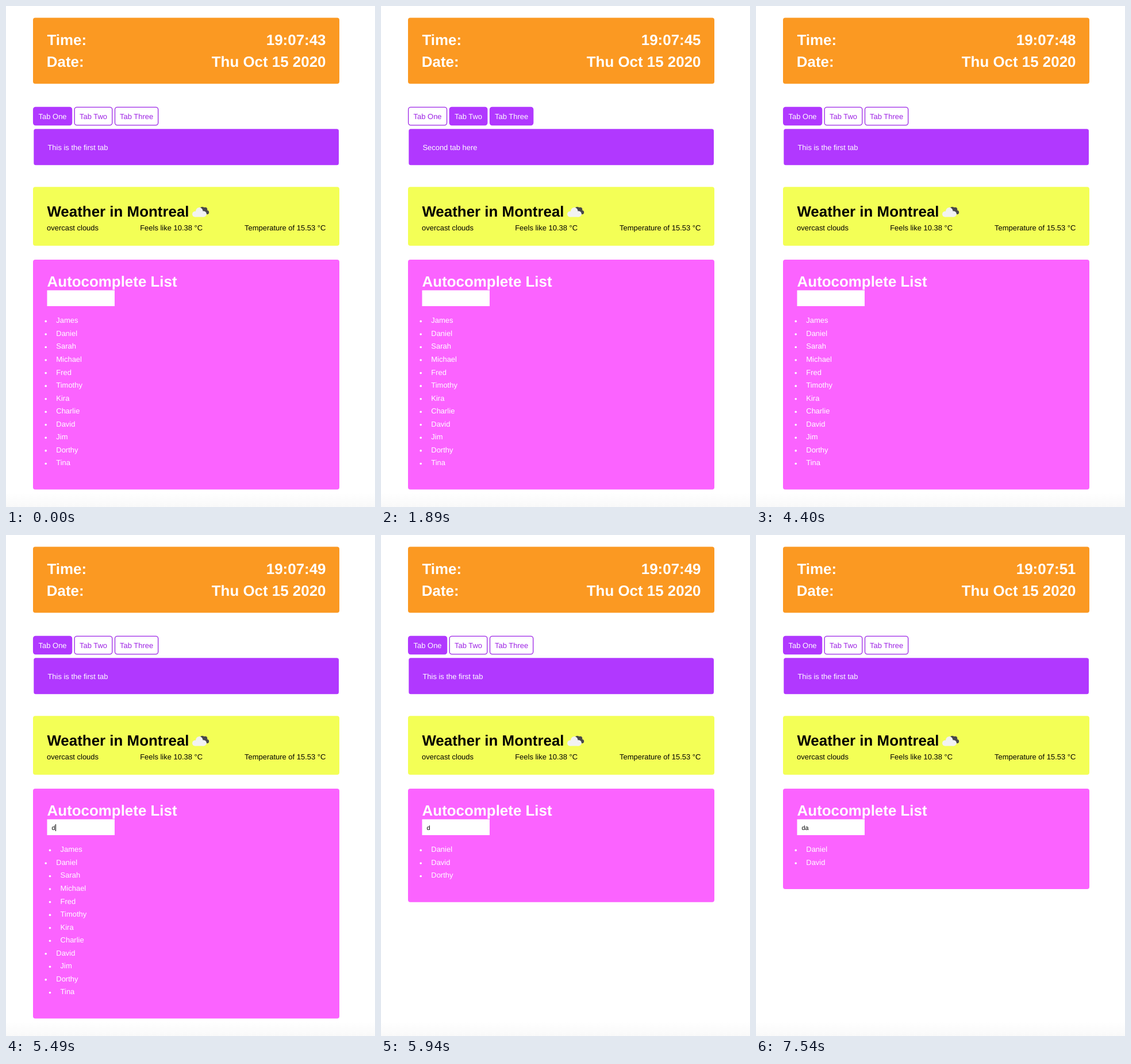
Write an HTML page that moves like this. It is 642 px wide and 873 px high and loops after 8 s.

```html
<!DOCTYPE html>
<html lang="en">
<head>
<meta charset="utf-8">
<title>Dashboard</title>
<style>
  html, body { margin: 0; width: 100%; height: 100%; overflow: hidden; background: #fff; }
  svg { display: block; }
  text { font: 12.96px "Liberation Sans", Arial, sans-serif; text-rendering: geometricPrecision; fill: #fff; }
  .big { font-size: 25.92px; font-weight: bold; }
  .end { text-anchor: end; }
  .dark text, #typed { fill: #000; }
  #typed { font-size: 10.8px; }
  .tab text { text-anchor: middle; fill: #9d22e4; }
  .tab rect { fill: #fff; stroke: #9d26e6; stroke-width: 1.3; }
  .tab.on text { fill: #fff; }
  .tab.on rect { fill: #b138ff; stroke: #b138ff; }
</style>
</head>
<body>
<svg width="642" height="873" viewBox="0 0 642 873">
  <defs>
    <linearGradient id="shade" x2="0" y2="1">
      <stop stop-color="#fff"/><stop offset="1" stop-color="#f9f9f9"/>
    </linearGradient>
  </defs>
  <rect y="848" width="642" height="25" fill="url(#shade)"/>

  <rect x="47" y="20.5" width="533" height="115" rx="4" fill="#fb9922"/>
  <text class="big" x="71.4" y="68">Time:</text>
  <text class="big end" x="556.5" y="68" id="clock"></text>
  <text class="big" x="70.8" y="105.5">Date:</text>
  <text class="big end" x="556.5" y="105.5">Thu Oct 15 2020</text>

  <g id="tabs"></g>
  <rect x="48.3" y="214.3" width="530.7" height="63" rx="3.5" fill="#b138ff"/>
  <text x="72.4" y="250.6" id="panel"></text>

  <g class="dark">
    <rect x="47" y="315.3" width="533" height="102.4" rx="4" fill="#f3ff56"/>
    <text class="big" x="71.4" y="367">Weather in Montreal</text>
    <text x="71" y="391.3">overcast clouds</text>
    <text x="233.2" y="391.3">Feels like 10.38 °C</text>
    <text class="end" x="556.3" y="391.3">Temperature of 15.53 °C</text>
  </g>
  <g fill="#48484a">
    <circle cx="341.5" cy="354" r="4"/><circle cx="346.5" cy="354.5" r="3.8"/>
    <circle cx="349.7" cy="359.5" r="3.5"/><rect x="340" y="354" width="9.5" height="9" rx="2"/>
  </g>
  <g fill="#f2f2f2">
    <circle cx="336.3" cy="357.3" r="6.2"/><circle cx="329" cy="362.7" r="4.9"/>
    <circle cx="343.7" cy="362.4" r="5.2"/><rect x="328.5" y="358" width="15.5" height="9.6"/>
  </g>

  <rect x="47" y="442" width="533" rx="4" fill="#fb63ff" id="card"/>
  <text class="big" x="71.6" y="489.3">Autocomplete List</text>
  <rect x="71.5" y="495.4" width="117.5" height="27.6" fill="#fff"/>
  <text x="79.4" y="513.6" id="typed"></text>
  <rect y="504" width="1" height="12" id="caret"/>
  <g id="list"></g>
</svg>
<script>
const $ = id => document.getElementById(id);
const LOOP = 8000, ROW = 22.55, STEP = 340 / 6;
const names = "James Daniel Sarah Michael Fred Timothy Kira Charlie David Jim Dorthy Tina".split(" ");
const ticks = [400, 1430, 2400, 3430, 4400, 5430, 6400, 7370];

const first = "This is the first tab", second = "Second tab here", third = "This is the third tab";
// time, filled tabs, panel text
const tabStates = [
  [0, "100", first], [1430, "110", first], [1660, "010", second],
  [1890, "011", second], [2570, "001", third], [2740, "011", third],
  [3260, "010", second], [3490, "110", second], [3770, "100", first]
];
// time, caret visible
const blinks = [[0, 0], [4970, 1], [5940, 0], [6400, 1], [6920, 0], [7030, 1], [7540, 0]];
// time, text in the field
const inputs = [[0, ""], [5430, "d"], [7030, "da"]];

const current = (states, t) => states.filter(s => s[0] <= t).pop();

$("tabs").innerHTML = [["One", 47.6, 67], ["Two", 119.2, 65.6], ["Three", 189.5, 75.2]].map(([name, x, w]) =>
  `<g class="tab"><rect x="${x}" y="176.4" width="${w}" height="31.2" rx="4"/>
   <text x="${x + w / 2}" y="197.4">Tab ${name}</text></g>`).join("");
$("list").innerHTML = names.map(name =>
  `<g><circle cx="69.2" cy="549.4" r="1.8" fill="#fff"/><text x="87.3" y="552.4">${name}</text></g>`).join("");

const tabs = [...$("tabs").children], items = [...$("list").children];
const matches = (name, query) => name.toLowerCase().startsWith(query);

// Rows that no longer match fly out to the right, then the list closes up.
function drawList(t, [since, query]) {
  const before = inputs.filter(s => s[0] < since).pop();
  const age = t - since, flying = before && age < 510;
  const q = (41 + STEP * Math.min(6, Math.floor(age / STEP + 0.01))) / 400;
  const out = q ** 3;
  let row = 0;
  items.forEach((item, i) => {
    const keep = matches(names[i], query);
    const shown = keep || flying && matches(names[i], before[1]);
    item.style.display = shown ? "" : "none";
    if (!shown) return;
    item.setAttribute("transform", `translate(${keep ? 0 : 500 * out} ${ROW * row++})`);
    item.setAttribute("opacity", keep ? 1 : 1 - out);
  });
  $("card").setAttribute("height", 130 + ROW * row);
}

function draw(t) {
  $("clock").textContent = "19:07:" + (43 + ticks.filter(tick => tick <= t).length);

  const [, filled, text] = current(tabStates, t);
  tabs.forEach((tab, i) => tab.classList.toggle("on", filled[i] === "1"));
  $("panel").textContent = text;

  const input = current(inputs, t);
  $("typed").textContent = input[1];
  $("caret").setAttribute("x", 80 + 6 * input[1].length);
  $("caret").setAttribute("opacity", current(blinks, t)[1]);
  drawList(t, input);
}

function frame() {
  draw(performance.now() % LOOP);
  requestAnimationFrame(frame);
}
frame();
</script>
</body>
</html>
```
